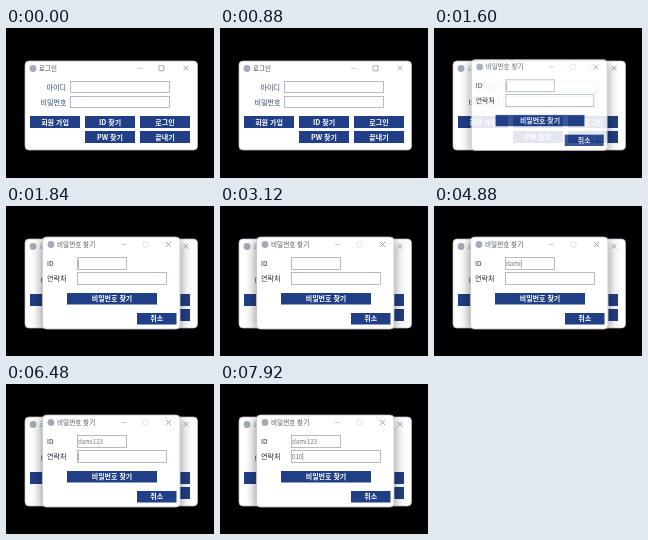
Recreate the animation shown at these times as an HTML page. Size 208 by 150 pixels, loop 8 s.

```html
<!DOCTYPE html>
<html lang="ko">
<head>
<meta charset="utf-8">
<style>
  html, body { margin: 0; width: 100%; height: 100%; overflow: hidden; background: #000; }
  svg { display: block; width: 100vw; height: 100vh; }
  text { font-family: "Noto Sans CJK KR", "Noto Sans CJK", "Noto Sans", sans-serif; white-space: pre; }
</style>
</head>
<body>
<svg id="stage" viewBox="0 0 208 150"></svg>
<script>
const LOOP = 8000;
const BLUE = '#213f86', NAVY = '#2d4778', INK = '#25282f', PRESSED = '#a9c3de';
const PRESS = 1360, OPEN = 1520, OPEN_TIME = 160, BLINK = 500;

// Each field: focus time, then the time of every key
const entries = [
  { focus: 1600, blur: 6160, x: 72, y: 58, text: 'dami123',
    keys: [4160, 4320, 4480, 4640, 5280, 5440, 5600] },
  { focus: 6160, blur: LOOP, x: 72, y: 72.5, text: '010',
    keys: [7280, 7520, 7920] }
];

const label = (x, y, s, size, fill, extra = '') =>
  `<text x="${x}" y="${y + size * 0.37}" font-size="${size}" fill="${fill}" ${extra}>${s}</text>`;

const field = (x, y, w, h) =>
  `<rect x="${x + 0.5}" y="${y + 0.5}" width="${w - 1}" height="${h - 1}" fill="#fff" stroke="#a2abb9" stroke-width=".8"/>`;

const button = (x, y, w, h, s, size, id = '') =>
  `<g ${id && `id="${id}"`}><rect x="${x}" y="${y}" width="${w}" height="${h}" fill="${BLUE}"/>` +
  label(x + w / 2, y + h / 2, s, size, '#fff', 'font-weight="900" text-anchor="middle"') + '</g>';

function controls([a, b, c], y, boxColor) {
  return `<g fill="none" stroke="#6d6d70" stroke-width=".6">
    <path d="M${a} ${y}h5" stroke="#aaa"/>
    <rect x="${b}" y="${y - 2.5}" width="5" height="5" rx=".5" stroke="${boxColor}"/>
    <path d="M${c} ${y - 2.5}l5 5m0-5l-5 5"/></g>`;
}

const frame = (x, y, w, h, stroke, extra = '') =>
  `<rect x="${x}" y="${y}" width="${w}" height="${h}" rx="4" fill="#fff" stroke="${stroke}" stroke-width=".7" ${extra}/>`;

const icon = (x, y) => `<circle cx="${x}" cy="${y}" r="3.4" fill="#a3abb8"/>`;

const login =
  frame(19, 33, 172.5, 89, '#cbbdd2') +
  icon(27, 40.5) + label(33, 40.3, '로그인', 6.5, '#444', 'id="title"') +
  controls([131, 153, 177.5], 40.3, '#6d6d70') +
  label(60, 59, '아이디', 7.1, NAVY, 'font-weight="500" text-anchor="end"') +
  label(60.5, 74, '비밀번호', 7.1, NAVY, 'font-weight="500" text-anchor="end"') +
  field(64, 53, 100, 12) + field(64, 68, 100, 12) +
  button(24, 88, 50, 12, '회원 가입', 7) +
  button(79, 88, 50, 12, 'ID 찾기', 7) +
  button(134, 88, 50, 12, '로그인', 7) +
  button(79, 103, 50, 12, 'PW 찾기', 7, 'find') +
  button(134, 103, 50, 12, '끝내기', 7);

const dialog =
  frame(36.5, 31, 137.5, 92, '#b9b9be', 'filter="url(#shadow)"') +
  icon(45, 38.5) + label(51, 38.3, '비밀번호 찾기', 6.6, '#555') +
  controls([115, 137, 160], 38.5, '#d2d2d4') +
  label(41, 57.8, 'ID', 6.6, INK, 'font-weight="500"') +
  label(41, 72.3, '연락처', 7, INK, 'font-weight="500"') +
  field(71, 51, 50, 13) + field(71, 66, 90, 13) +
  entries.map((e, i) =>
    label(e.x, e.y, '', 6.2, '#70757c', `id="entry${i}"`) +
    `<rect id="caret${i}" y="${e.y - 4}" width=".7" height="8" fill="#888"/>`).join('') +
  button(61, 87, 90, 11.5, '비밀번호 찾기', 7) +
  button(131, 107, 39.5, 11.5, '취소', 7);

const $ = id => document.getElementById(id);
$('stage').innerHTML = `
  <defs><filter id="shadow" x="-20%" y="-20%" width="140%" height="150%">
    <feDropShadow dx="0" dy="3" stdDeviation="6" flood-color="#000" flood-opacity=".5"/>
  </filter></defs>
  <rect width="208" height="150" fill="#000"/>
  <g>${login}</g><g id="dialog">${dialog}</g>`;

const find = $('find').firstChild, findText = $('find').lastChild;

function drawEntry(e, i, t) {
  const count = e.keys.filter(k => k <= t).length;
  const text = $('entry' + i), caret = $('caret' + i);
  const shown = e.text.slice(0, count);
  if (text.textContent !== shown) text.textContent = shown;
  const since = t - (count ? e.keys[count - 1] : e.focus);
  const on = t >= e.focus && t < e.blur && Math.floor(since / BLINK) % 2 === 0;
  caret.setAttribute('x', e.x + (count ? text.getComputedTextLength() + 0.2 : 0));
  caret.setAttribute('opacity', on ? 1 : 0);
}

function draw(t) {
  const down = t >= PRESS && t < OPEN;
  find.setAttribute('fill', down ? PRESSED : BLUE);
  findText.setAttribute('fill', down ? '#e4edf6' : '#fff');
  $('title').setAttribute('fill', t < OPEN ? '#444' : '#aaa');

  const p = Math.min(1, Math.max(0, (t - OPEN) / OPEN_TIME));
  const ease = 1 - (1 - p) ** 3;
  const box = $('dialog');
  box.setAttribute('visibility', p > 0 ? 'visible' : 'hidden');
  box.setAttribute('opacity', ease);
  box.setAttribute('transform', `translate(105 77) scale(${0.9 + 0.1 * ease}) translate(-105 -77)`);
  entries.forEach((e, i) => drawEntry(e, i, t));
}

const start = performance.now();
function tick() {
  draw((performance.now() - start) % LOOP);
  requestAnimationFrame(tick);
}
tick();
</script>
</body>
</html>
```
